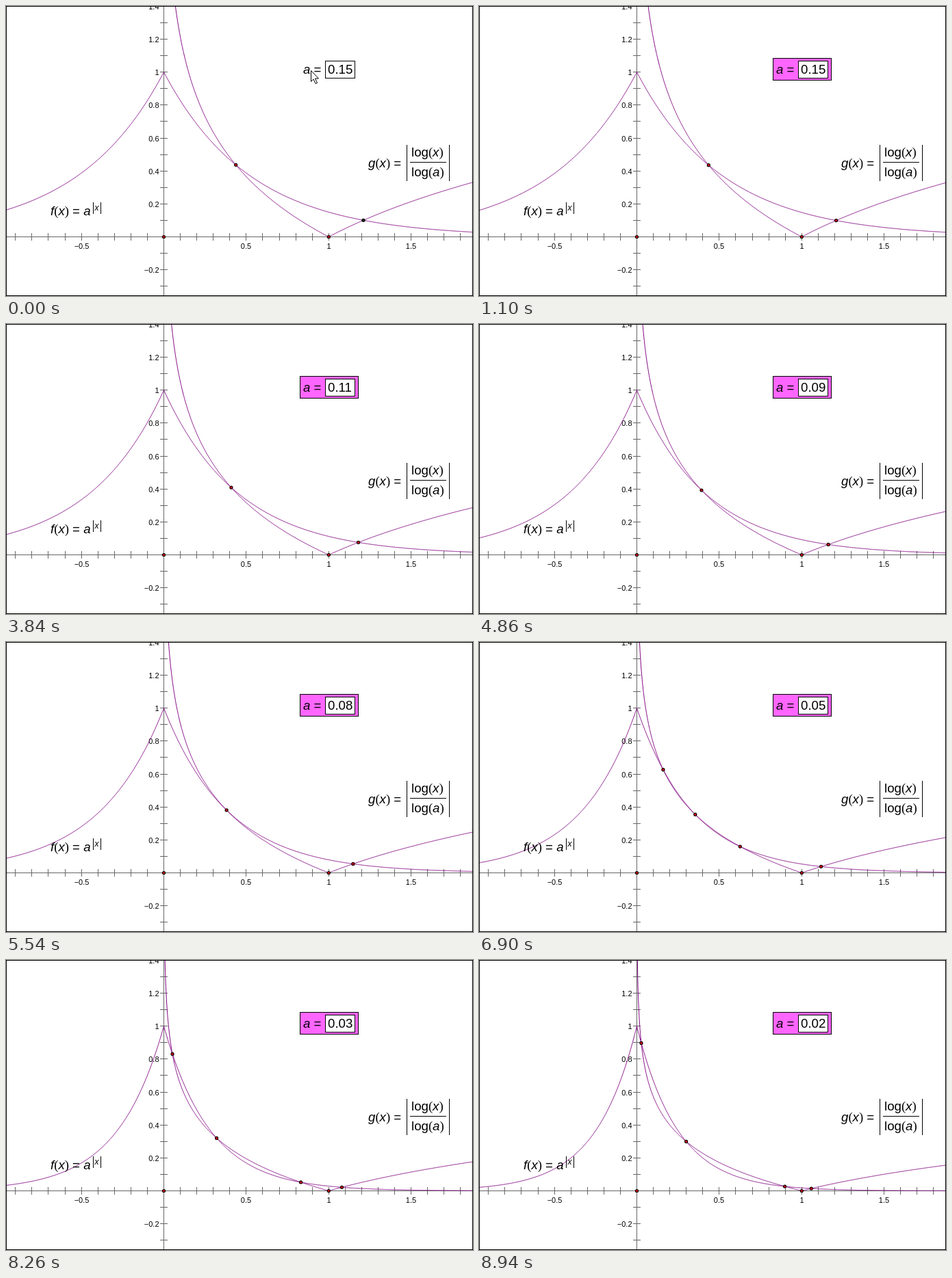
Write an HTML page with a canvas that moves like this. It is 682 by 424 pixels and loops after 9.26 s.

```html
<!DOCTYPE html>
<html lang="en">
<head>
<meta charset="utf-8">
<title>Intersections of f and g</title>
<style>
  html, body { margin: 0; width: 100%; height: 100%; overflow: hidden; background: #fff; }
  canvas { display: block; }
</style>
</head>
<body>
<canvas id="stage" width="682" height="424"></canvas>
<script>
const W = 682, H = 424, LOOP = 9260;
const ORIGIN_X = 230.5, ORIGIN_Y = 337.5, UNIT = 240.8;
const SANS = '"Liberation Sans", Arial, sans-serif';
const SERIF = '"Liberation Serif", "Times New Roman", serif';
const SIZE = 18.67;
const ctx = document.getElementById('stage').getContext('2d');

// Pairs of step number and value of the parameter, linear in between.
const KEYS = [[0, .15], [1, .148], [3, .139], [7, .112], [12, .079],
              [16, .0535], [18, .0393], [22, .0178]];

const px = x => ORIGIN_X + x * UNIT;
const py = y => ORIGIN_Y - y * UNIT;

function stepAt(t) {
  if (t < 1100) return 0;
  if (t < 1800) return 1;
  if (t < 2480) return 2;
  return Math.min(22, 3 + Math.floor((t - 2480) / 340));
}

function parameterAt(step) {
  const i = Math.max(1, KEYS.findIndex(([k]) => k >= step));
  const [k0, a0] = KEYS[i - 1], [k1, a1] = KEYS[i];
  return a0 + (a1 - a0) * (step - k0) / (k1 - k0);
}

// Root of an increasing function
function bisect(fn, lo, hi) {
  for (let i = 0; i < 50; i++) {
    const mid = (lo + hi) / 2;
    if (fn(mid) < 0) lo = mid; else hi = mid;
  }
  return lo;
}

function line(x1, y1, x2, y2, color = '#000') {
  ctx.strokeStyle = color;
  ctx.lineWidth = 1;
  ctx.beginPath();
  ctx.moveTo(x1, y1);
  ctx.lineTo(x2, y2);
  ctx.stroke();
}

function box(x, y, w, h, fill) {
  ctx.fillStyle = fill;
  ctx.fillRect(x, y, w, h);
  ctx.strokeStyle = '#000';
  ctx.lineWidth = 1;
  ctx.strokeRect(x + .5, y + .5, w - 1, h - 1);
}

function text(str, x, y, font, align = 'left') {
  ctx.font = font;
  ctx.textAlign = align;
  ctx.fillStyle = '#000';
  ctx.fillText(str, x, y);
  return x + ctx.measureText(str).width;
}

// Variables are italic, parentheses are serif, the rest is upright.
function formula(str, x, y) {
  for (const part of str.match(/log|[a-z]|[()]|[^a-z()]+/g)) {
    const font = /[()]/.test(part) ? `${SIZE}px ${SERIF}`
      : /^[a-z]$/.test(part) ? `italic ${SIZE}px ${SANS}` : `${SIZE}px ${SANS}`;
    x = text(part, x, y, font);
  }
}

function drawAxes() {
  const gray = '#666', font = `11px ${SANS}`;
  const label = n => String(n / 10).replace('-', '\u2212');
  line(0, ORIGIN_Y, W, ORIGIN_Y, gray);
  line(ORIGIN_X, 0, ORIGIN_X, H, gray);
  for (let n = -9; n <= 18; n++) {
    const x = Math.floor(px(n / 10)) + .5;
    line(x, 332, x, 343, gray);
    if (n && n % 5 === 0) text(label(n), x, 355, font, 'center');
  }
  for (let n = -3; n <= 14; n++) {
    const y = Math.floor(py(n / 10)) + .5;
    line(225, y, 236, y, gray);
    if (n && (n % 2 === 0)) text(label(n), 223.5, y + 4, font, 'right');
  }
}

function plot(fn, from) {
  ctx.strokeStyle = '#800080';
  ctx.lineWidth = 1;
  ctx.beginPath();
  for (let x = from; x <= W; x += .25) ctx.lineTo(x, py(fn((x - ORIGIN_X) / UNIT)));
  ctx.stroke();
}

function dot(x, y, fill = '#d00018') {
  for (const [r, color] of [[2.6, '#000'], [1.6, fill]]) {
    ctx.fillStyle = color;
    ctx.beginPath();
    ctx.arc(px(x), py(y), r, 0, 2 * Math.PI);
    ctx.fill();
  }
}

function drawDots(a, f) {
  const outer = bisect(x => -Math.log(x) / Math.log(a) - f(x), 1, 2);
  const middle = bisect(x => x - f(x), 0, 1);
  dot(0, 0);
  dot(1, 0);
  dot(middle, middle);
  dot(outer, f(outer), a === .15 ? '#102810' : undefined);

  // Below e^-e the two curves cross at two more mirrored points.
  if (a < Math.exp(-Math.E)) {
    let low = 0;
    for (let i = 0; i < 2000; i++) low = f(f(low));
    dot(low, f(low));
    dot(f(low), low);
  }
}

function drawFormulas() {
  formula('f(x) = a', 65, 306);
  line(127.5, 287, 127.5, 304);
  text('x', 129.5, 299, `italic 12px ${SANS}`);
  line(138.5, 287, 138.5, 304);

  formula('g(x) =', 529, 236);
  line(585.5, 203, 585.5, 256);
  line(647.5, 203, 647.5, 256);
  line(590, 228.5, 643, 228.5);
  formula('log(x)', 592, 220);
  formula('log(a)', 592, 249);
}

function drawParameter(a, selected) {
  if (selected) box(429, 76, 86, 33, '#ff66ff');
  formula('a =', 434, 99);
  box(466, 80, 44, 26, '#fff');
  text(a.toFixed(2), 470, 99, `${SIZE}px ${SANS}`);
}

function drawCursor(x, y) {
  const outline = [[0, 0], [0, 16], [3.5, 12.5], [6.5, 19], [9, 18], [6, 11.5], [11, 11.5]];
  ctx.beginPath();
  for (const [dx, dy] of outline) ctx.lineTo(x + .5 + dx, y + .5 + dy);
  ctx.closePath();
  ctx.fillStyle = '#fff';
  ctx.fill();
  ctx.strokeStyle = '#000';
  ctx.lineWidth = 1;
  ctx.stroke();
}

function draw(t) {
  const a = parameterAt(stepAt(t));
  const f = x => Math.pow(a, Math.abs(x));
  const g = x => Math.abs(Math.log(x) / Math.log(a));

  ctx.fillStyle = '#fff';
  ctx.fillRect(0, 0, W, H);
  drawAxes();
  plot(f, 0);
  plot(g, px(Math.pow(a, 1.5)));
  drawDots(a, f);
  drawFormulas();
  drawParameter(a, t >= 100);
  if (t < 100) drawCursor(445, 94);
  else if (t < 780) drawCursor(480, 88);
  ctx.strokeStyle = '#000';
  ctx.strokeRect(.5, .5, W - 1, H - 1);
}

const start = performance.now();
function tick() {
  draw((performance.now() - start) % LOOP);
  requestAnimationFrame(tick);
}
tick();
</script>
</body>
</html>
```
